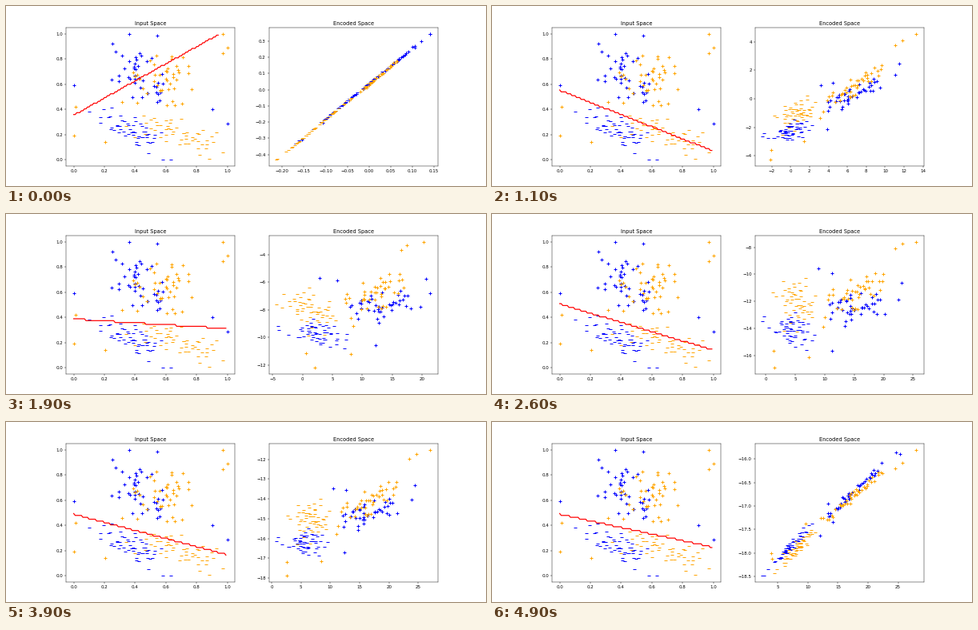
Animation of 600x225 px, one loop 5000 ms. Source, as a matplotlib script:

```python
import numpy as np
import matplotlib.pyplot as plt
from matplotlib.animation import FuncAnimation

plt.rcParams["font.family"] = "DejaVu Sans"

FRAMES, INTERVAL = 50, 100
DPI = 40
GRID_X = np.arange(0, 1, 0.01)
LEVEL = 0.015
rng = np.random.default_rng(4)


def cluster(count, x_range, y_mid, slope, spread, outliers):
    """Random points along a sloping band, plus a few fixed outliers."""
    x = rng.triangular(*x_range, count)
    y = y_mid + slope * (x - x_range[1]) + rng.triangular(-spread, 0, spread, count)
    return np.vstack([outliers, np.column_stack([x, np.clip(y, 0.01, 0.97)])])


groups = [
    (cluster(39, (0.14, 0.42, 0.62), 0.66, -0.4, 0.25,
             [(0, 0.59), (1, 0.29), (0.9, 0.4), (0.36, 1), (0.545, 0.985), (0.25, 0.92)]),
     "blue", "+"),
    (cluster(42, (0.27, 0.66, 0.85), 0.62, 0.3, 0.29,
             [(0, 0.19), (0.01, 0.42), (0.205, 0.145), (0.97, 1), (1, 0.89), (0.97, 0.845)]),
     "orange", "+"),
    (cluster(53, (0.13, 0.36, 0.58), 0.24, -0.5, 0.13,
             [(0.58, 0), (0.63, 0), (0.1, 0.385)]),
     "blue", "_"),
    (cluster(49, (0.38, 0.56, 0.97), 0.24, -0.28, 0.14,
             [(0.88, 0.01), (0.97, 0.06), (0.93, 0.22), (0.34, 0.27)]),
     "orange", "_")]

# Key poses: time, then weights (x, y, bias) of both encoded axes,
# then the height of the decision boundary at x = 0 and x = 1.
POSES = np.array([
    (0, -0.176, 0.255, -0.05, -0.40, 0.55, -0.062, 0.355, 1.035),
    (1100, 3.7, 14.3, -4.6, 4.7, 5.2, -5.2, 0.552, 0.07),
    (1900, -1.9, 24.2, -2.1, 6.1, 3.9, -12.9, 0.388, 0.312),
    (2600, 4.9, 23.4, -2.6, 7.0, 3.0, -17.4, 0.508, 0.14),
    (3900, 5.3, 23.3, -1.4, 4.1, 2.9, -18.4, 0.489, 0.168),
    (4900, 5.6, 22.6, 0.0, 0.1, 2.56, -18.46, 0.489, 0.227)])


def fit_limits(ax, points):
    low, high = points.min(axis=0), points.max(axis=0)
    pad = 0.05 * (high - low)
    ax.set_xlim(low[0] - pad[0], high[0] + pad[0])
    ax.set_ylim(low[1] - pad[1], high[1] + pad[1])


def scatter(ax, points, color, marker):
    return ax.scatter(*points.T, s=60, c=color, marker=marker, linewidths=1.8)


def encode(points, weights):
    x, y = points.T
    bent = y - 0.1 * np.maximum(0, 0.35 - y)
    features = np.column_stack([x, bent, np.ones(len(points))])
    return features @ weights.reshape(2, 3).T


fig, (ax_in, ax_enc) = plt.subplots(1, 2, figsize=(600 / DPI, 225 / DPI), dpi=DPI)
ax_in.set_title("Input Space")
ax_enc.set_title("Encoded Space")

for group in groups:
    scatter(ax_in, *group)
clouds = [scatter(ax_enc, *group) for group in groups]
fit_limits(ax_in, np.vstack([points for points, _, _ in groups]))
boundary, = ax_in.plot([], [], color="red", lw=2.2, zorder=3)


def update(frame):
    pose = np.array([np.interp(frame * INTERVAL, POSES[:, 0], track)
                     for track in POSES[:, 1:].T])
    encoded = [encode(points, pose[:6]) for points, _, _ in groups]
    for cloud, points in zip(clouds, encoded):
        cloud.set_offsets(points)
    fit_limits(ax_enc, np.vstack(encoded))

    start, end = pose[6:]
    height = np.round((start + (end - start) * GRID_X) / LEVEL) * LEVEL
    inside = height <= 0.995
    boundary.set_data(GRID_X[inside], height[inside])
    return [*clouds, boundary]


anim = FuncAnimation(fig, update, frames=FRAMES, interval=INTERVAL,
                     repeat=True, repeat_delay=0, blit=False)
plt.show()
```
